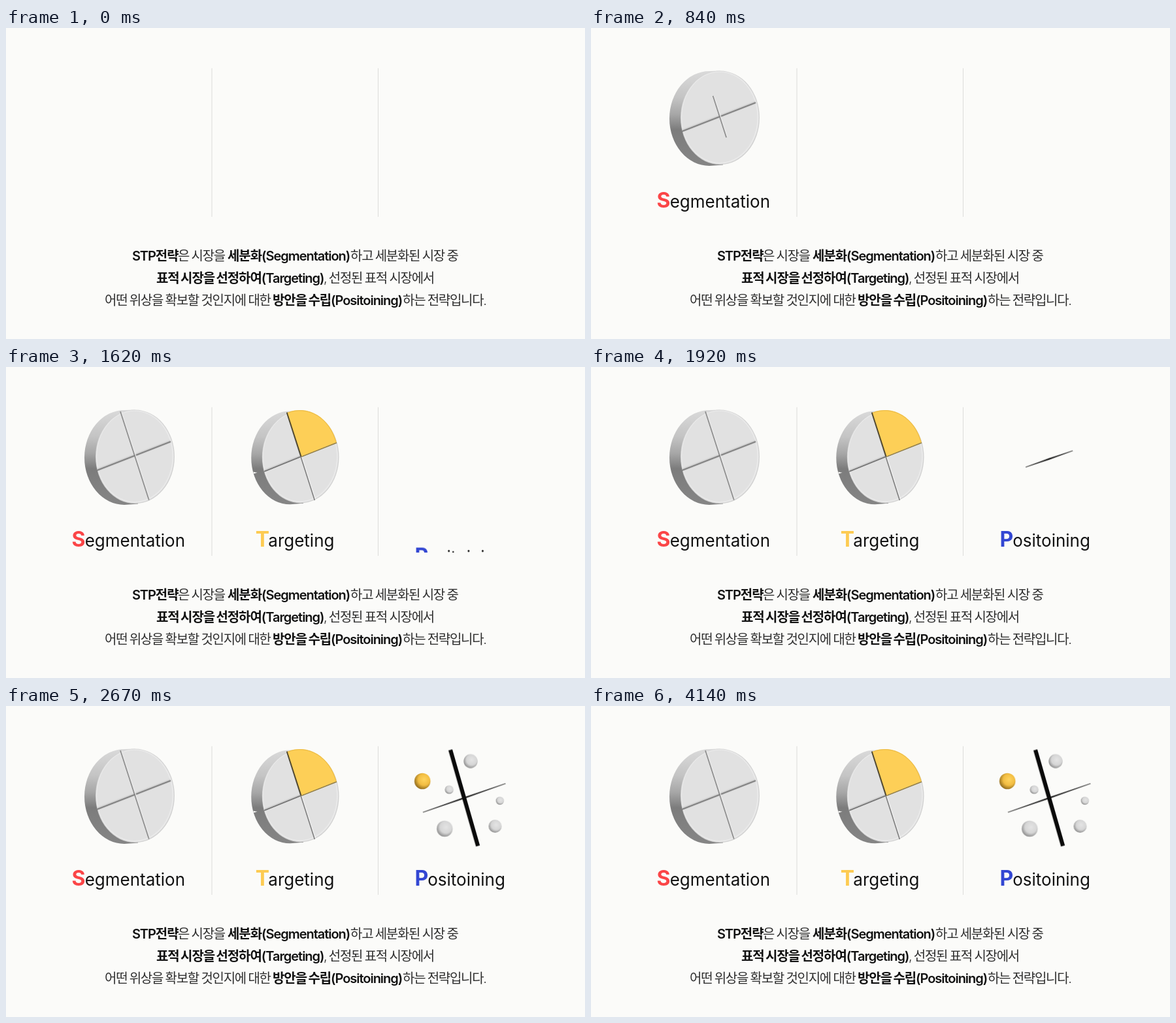
Recreate the animation shown at these times as an HTML page. Size 886 px wide and 476 px high, loop 4500 ms.

```html
<!DOCTYPE html>
<html lang="ko">
<head>
<meta charset="utf-8">
<title>STP</title>
<style>
html, body { margin: 0; width: 100%; height: 100%; overflow: hidden; background: #fbfbf9; }
svg { display: block; width: 886px; height: 476px; }
text { font-family: Inter, "Noto Sans CJK KR", sans-serif; fill: #111; }
.label { font-size: 26px; }
.label .cap { font-size: 32px; font-weight: 700; }
.copy { font-size: 20px; }
.copy tspan { font-family: Inter, "Noto Sans CJK KR Light", "Noto Sans CJK KR DemiLight", "Noto Sans CJK KR", sans-serif; font-weight: 300; letter-spacing: -1.27px; word-spacing: -.9px; fill: #2e2e2e; }
.copy .b { font-family: Inter, "Noto Sans CJK KR", sans-serif; font-weight: 600; letter-spacing: -1.04px; word-spacing: -1.7px; fill: #111; }

/* one shared 4.5 s loop: 1% = 45 ms */
.a { animation: 4.5s cubic-bezier(.215, .61, .355, 1) infinite both; }
.s-label { animation-name: s-label; }
.t-label { animation-name: t-label; }
.p-label { animation-name: p-label; }
.s-disc { animation-name: s-disc; }
.t-disc { animation-name: t-disc; }
.cut1 { animation-name: cut1; animation-timing-function: ease-in-out; }
.cut2 { animation-name: cut2; animation-timing-function: ease-in-out; }
.slice { animation-name: slice; animation-timing-function: linear; }
.axis1 { animation-name: axis1; animation-timing-function: ease-in-out; }
.axis2 { animation-name: axis2; animation-timing-function: ease-in-out; }
.b1 { animation-name: b1; } .b2 { animation-name: b2; } .b3 { animation-name: b3; }
.b4 { animation-name: b4; } .b5 { animation-name: b5; } .b6 { animation-name: b6; }

@keyframes s-label { 0%, .45% { transform: translateY(36px) } 5.8%, 100% { transform: none } }
@keyframes t-label { 0%, 18.67% { transform: translateY(36px) } 24%, 100% { transform: none } }
@keyframes p-label { 0%, 35.45% { transform: translateY(36px) } 40.8%, 100% { transform: none } }
@keyframes s-disc { 0%, 6.67% { transform: translateY(150px) } 14.5%, 100% { transform: none } }
@keyframes t-disc { 0%, 23.33% { transform: translateY(150px) } 31.2%, 100% { transform: none } }
@keyframes cut1 { 0%, 13.55% { transform: scaleX(0) } 17%, 100% { transform: none } }
@keyframes cut2 { 0%, 17% { transform: scaleX(0) } 20.5%, 100% { transform: none } }
@keyframes slice { 0%, 31.2% { opacity: 0 } 35%, 100% { opacity: 1 } }
@keyframes axis1 { 0%, 40.67% { transform: scaleX(0) } 44.4%, 100% { transform: none } }
@keyframes axis2 { 0%, 44.4% { transform: scaleX(0) } 48%, 100% { transform: none } }
@keyframes b1 { 0%, 48.2% { transform: scale(0) } 52.2%, 100% { transform: none } }
@keyframes b2 { 0%, 49.6% { transform: scale(0) } 53.6%, 100% { transform: none } }
@keyframes b3 { 0%, 51% { transform: scale(0) } 55%, 100% { transform: none } }
@keyframes b4 { 0%, 52.4% { transform: scale(0) } 56.4%, 100% { transform: none } }
@keyframes b5 { 0%, 53.8% { transform: scale(0) } 57.8%, 100% { transform: none } }
@keyframes b6 { 0%, 55.2% { transform: scale(0) } 59.2%, 100% { transform: none } }
</style>
</head>
<body>
<svg viewBox="0 0 886 476">
  <defs>
    <clipPath id="disc-mask"><rect y="40" width="886" height="172"/></clipPath>
    <clipPath id="label-mask"><rect y="240" width="886" height="43.5"/></clipPath>
    <linearGradient id="side" x1="0" y1="0" x2="0" y2="1">
      <stop offset="0" stop-color="#dadada"/>
      <stop offset=".28" stop-color="#c4c4c4"/>
      <stop offset=".46" stop-color="#a6a6a6"/>
      <stop offset=".62" stop-color="#7c7c7c"/>
      <stop offset="1" stop-color="#858585"/>
    </linearGradient>
    <radialGradient id="grey" cx=".58" cy=".4" r=".62">
      <stop offset="0" stop-color="#e4e4e4"/>
      <stop offset=".6" stop-color="#d6d6d6"/>
      <stop offset="1" stop-color="#8e8e8e"/>
    </radialGradient>
    <radialGradient id="gold" cx=".6" cy=".4" r=".65">
      <stop offset="0" stop-color="#ffd45e"/>
      <stop offset=".55" stop-color="#f2bd42"/>
      <stop offset="1" stop-color="#8a6518"/>
    </radialGradient>
    <g id="disc">
      <path d="M181 66A61 72.5 0 0 0 181 211L202 209.5L197.5 65.5Z" fill="url(#side)"/>
      <ellipse cx="197.5" cy="137.3" rx="60.5" ry="71.8" fill="#d2d2d2"/>
      <ellipse cx="197.2" cy="137" rx="59.4" ry="70.8" fill="#e9e9e9"/>
      <ellipse cx="196.8" cy="136.8" rx="57.6" ry="69" fill="#e1e1e1"/>
    </g>
    <g id="cut">
      <path d="M-61-1.6H59" stroke="#cfcfcf" stroke-width="1.6"/>
      <path d="M-62 .2H59" stroke="#767676" stroke-width="1.9"/>
    </g>
    <g id="cut-long">
      <path d="M-70-1.4H70" stroke="#efefef" stroke-width="1.4"/>
      <path d="M-71 .2H71.5" stroke="#7d7d7d" stroke-width="1.6"/>
    </g>
  </defs>

  <path d="M315 61.5V289M569.5 61.5V289" stroke="#dcdcda"/>

  <g clip-path="url(#disc-mask)">
    <g class="a s-disc">
      <use href="#disc"/>
      <g transform="translate(197 135.5) rotate(-21.3)"><use href="#cut" class="a cut1"/></g>
      <g transform="translate(197 135.5) rotate(72.1)"><use href="#cut-long" class="a cut2"/></g>
    </g>
    <g class="a t-disc">
      <g transform="translate(258.5 2.5) scale(.973 .985)">
        <use href="#disc"/>
        <use href="#cut" transform="translate(198 136.5) rotate(-21.8)"/>
        <use href="#cut-long" transform="translate(198 136.5) rotate(72.1)"/>
      </g>
      <path d="M378.5 160.5l6 1.2l-5.5 1.6z" fill="#fbfbf9"/>
      <g class="a slice">
        <path d="M430 70A58.9 70.7 0 0 1 506 115.5L452 137Z" fill="#fdcf57"/>
        <path d="M431 70.4A58 70 0 0 1 505 115" fill="none" stroke="#e9b945"/>
        <path d="M429.8 69.5L451.6 137" stroke="#4c4327" stroke-width="1.6"/>
        <path d="M452 137.4L506 116" stroke="#94814a" stroke-width="1.4"/>
      </g>
    </g>
  </g>

  <g transform="translate(701.2 140.7) rotate(-19.2)">
    <path class="a axis1" d="M-67 0L0-1L67 0L0 1Z" fill="#1c1c1c" stroke="#1c1c1c" stroke-width=".5"/>
  </g>
  <g transform="translate(701.2 140.7) rotate(74)">
    <path class="a axis2" d="M-76.5-3.1H76.5V3.3H-76.5Z" fill="#0b0b0b"/>
  </g>

  <g fill="url(#grey)">
    <g transform="translate(711 84.5)"><circle class="a b1" r="10.7"/></g>
    <g transform="translate(678.2 128)"><circle class="a b2" r="6.6"/></g>
    <g transform="translate(755.8 145)"><circle class="a b3" r="6.2"/></g>
    <g transform="translate(748.5 184)"><circle class="a b4" r="10"/></g>
    <g transform="translate(671.3 187.8)"><circle class="a b5" r="12.2"/></g>
    <g transform="translate(637.2 115)"><circle class="a b6" r="12.3" fill="url(#gold)"/></g>
  </g>

  <g class="label" clip-path="url(#label-mask)">
    <g class="a s-label">
      <text class="cap" x="100.5" y="275" style="fill:#fb4547">S</text><text x="120.7" y="275">egmentation</text>
    </g>
    <g class="a t-label">
      <text class="cap" x="381.8" y="275" style="fill:#fdcb52">T</text><text x="401.3" y="275">argeting</text>
    </g>
    <g class="a p-label">
      <text class="cap" x="625.5" y="275" style="fill:#3347d3">P</text><text x="645.2" y="275">ositoining</text>
    </g>
  </g>

  <g class="copy">
    <text y="355.5"><tspan class="b" x="193">STP전략</tspan><tspan x="263">은 시장을</tspan><tspan class="b" x="339">세분화(Segmentation)</tspan><tspan x="527">하고 세분화된 시장 중</tspan></text>
    <text y="389.5"><tspan class="b" x="230">표적 시장을 선정하여(Targeting)</tspan><tspan x="486">, 선정된 표적 시장에서</tspan></text>
    <text y="423.5"><tspan x="151">어떤 위상을 확보할 것인지에 대한</tspan><tspan class="b" x="408">방안을 수립(Positoining)</tspan><tspan x="607">하는 전략입니다.</tspan></text>
  </g>
</svg>
</body>
</html>
```
